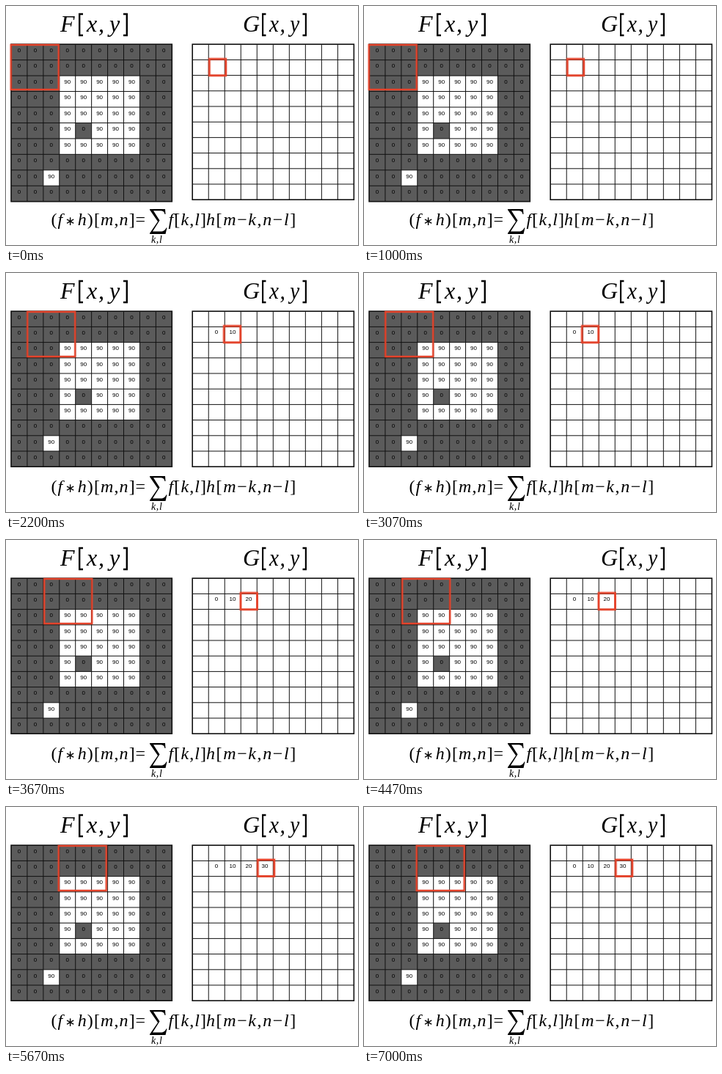
These frames come from a looping animation (480x326 px, 7.07 s). An HTML page:

```html
<!DOCTYPE html>
<html lang="en">
<head>
<meta charset="utf-8">
<title>Box filter</title>
<style>
  html, body { margin: 0; width: 100%; height: 100%; overflow: hidden; background: #fff; }
  svg { display: block; width: 480px; height: 326px; }
  .cell { font: 8px "Liberation Sans", Arial, sans-serif; text-anchor: middle; }
  .title { font: italic 32px "Liberation Serif", Times, serif; }
  .sum { font: 24px "Liberation Serif", Times, serif; letter-spacing: 1.1px; }
  .sum tspan, .under { font-style: italic; }
  .sum .star { font-size: 17px; font-style: normal; }
  .under { font-size: 14px; letter-spacing: .6px; }
  .bracket { fill: none; stroke: #000; stroke-width: 2.4; }
  .frame { fill: none; stroke: #e5432b; }

  /* Hard switches at 2130, 3530 and 5270 ms */
  .anim { animation: 7070ms step-end infinite; }
  #window { animation-name: window; }
  #pixel { animation-name: pixel; }
  #tall { animation-name: before; }
  #even, .v0, .v1 { animation-name: after1; }
  .v2 { animation-name: after2; }
  .v3 { animation-name: after3; }
  @keyframes window {
    0% { transform: translate(6.7px, 53px); }
    30.13% { transform: translate(29.2px, 53px); }
    49.93% { transform: translate(52.2px, 53px); }
    74.54% { transform: translate(71.7px, 53px); }
  }
  @keyframes pixel {
    0% { transform: translate(277.3px, 72.3px); }
    30.13% { transform: translate(297.3px, 72.3px); }
    49.93% { transform: translate(320px, 72.3px); }
    74.54% { transform: translate(343.3px, 72px); }
  }
  @keyframes before { 0% { visibility: visible; } 30.13%, 100% { visibility: hidden; } }
  @keyframes after1 { 0% { visibility: hidden; } 30.13%, 100% { visibility: visible; } }
  @keyframes after2 { 0% { visibility: hidden; } 49.93%, 100% { visibility: visible; } }
  @keyframes after3 { 0% { visibility: hidden; } 74.54%, 100% { visibility: visible; } }
</style>
</head>
<body>
<svg viewBox="0 0 480 326">
  <defs>
    <g id="args">
      <path class="bracket" d="M6 -24H1.200V5H6M61 -24H65.800V5H61"/>
      <text class="title"><tspan x="11">x</tspan><tspan x="27">,</tspan><tspan x="42">y</tspan></text>
    </g>
  </defs>

  <text class="title" x="74" y="35">F</text>
  <use href="#args" transform="translate(99 35)"/>
  <text class="title" x="323" y="35">G</text>
  <use href="#args" transform="translate(349 35) scale(.91 1)"/>

  <g id="tall" class="anim"></g>
  <g id="even" class="anim"></g>
  <g id="result"></g>

  <rect id="window" class="frame anim" width="65" height="61" stroke-width="2.500"/>
  <rect id="pixel" class="frame anim" width="22.500" height="22.500" stroke-width="2.900"/>

  <g class="sum">
    <text x="61.500" y="299">(<tspan>f</tspan><tspan class="star" dx="2">∗</tspan><tspan dx="2">h</tspan>)[<tspan>m</tspan>,<tspan>n</tspan>]</text>
    <text x="176.500" y="299">=</text>
    <path d="M196 277H217L217.500 284H216.500C215.500 280 214 279.200 210 279.200H201L209.500 292.500L200 307.500H211C215 307.500 217 306 218.500 302.500H219.500L217.500 311H196V310L207 294L196 278Z"/>
    <text class="under" x="198" y="323">k,l</text>
    <text x="221.500" y="299"><tspan>f</tspan>[<tspan>k</tspan>,<tspan>l</tspan>]</text>
    <text x="273" y="299" style="letter-spacing:1.6px"><tspan>h</tspan>[<tspan>m</tspan>−<tspan>k</tspan>,<tspan>n</tspan>−<tspan>l</tspan>]</text>
  </g>
</svg>
<script>
  const N = 10, TOP = 52.2;

  function add(parent, name, attrs, text = "") {
    const el = document.createElementNS("http://www.w3.org/2000/svg", name);
    for (const key in attrs) el.setAttribute(key, attrs[key]);
    el.textContent = text;
    parent.append(el);
    return el;
  }

  function drawLines(parent, x, w, h) {
    let d = "";
    for (let i = 1; i < N; i++) {
      d += `M${x + i * w / N} ${TOP}v${h}M${x} ${TOP + i * h / N}h${w}`;
    }
    add(parent, "path", { d, stroke: "#111", "stroke-width": 1 });
    add(parent, "rect", { x, y: TOP, width: w, height: h, fill: "none", stroke: "#111", "stroke-width": 1.6 });
  }

  const isBright = (r, c) =>
    (r >= 2 && r <= 6 && c >= 3 && c <= 7 && !(r === 5 && c === 4)) || (r === 8 && c === 2);

  function drawInput(id, h) {
    const g = document.getElementById(id), x = 7, w = 219.3, cw = w / N, ch = h / N;
    add(g, "rect", { x, y: TOP, width: w, height: h, fill: "#5b5b5b" });
    for (let r = 0; r < N; r++) {
      for (let c = 0; c < N; c++) {
        const left = x + c * cw, top = TOP + r * ch, bright = isBright(r, c);
        if (bright) add(g, "rect", { x: left, y: top, width: cw, height: ch, fill: "#fff" });
        add(g, "text", { class: "cell", x: left + cw / 2, y: top + 10.7 }, bright ? 90 : 0);
      }
    }
    drawLines(g, x, w, h);
  }

  drawInput("tall", 214.5);
  drawInput("even", 212);

  const result = document.getElementById("result");
  drawLines(result, 254.2, 220.2, 212);
  for (let i = 0; i < 4; i++) {
    add(result, "text", { class: `cell anim v${i}`, x: 287 + 22 * i, y: 83 }, 10 * i);
  }
</script>
</body>
</html>
```
